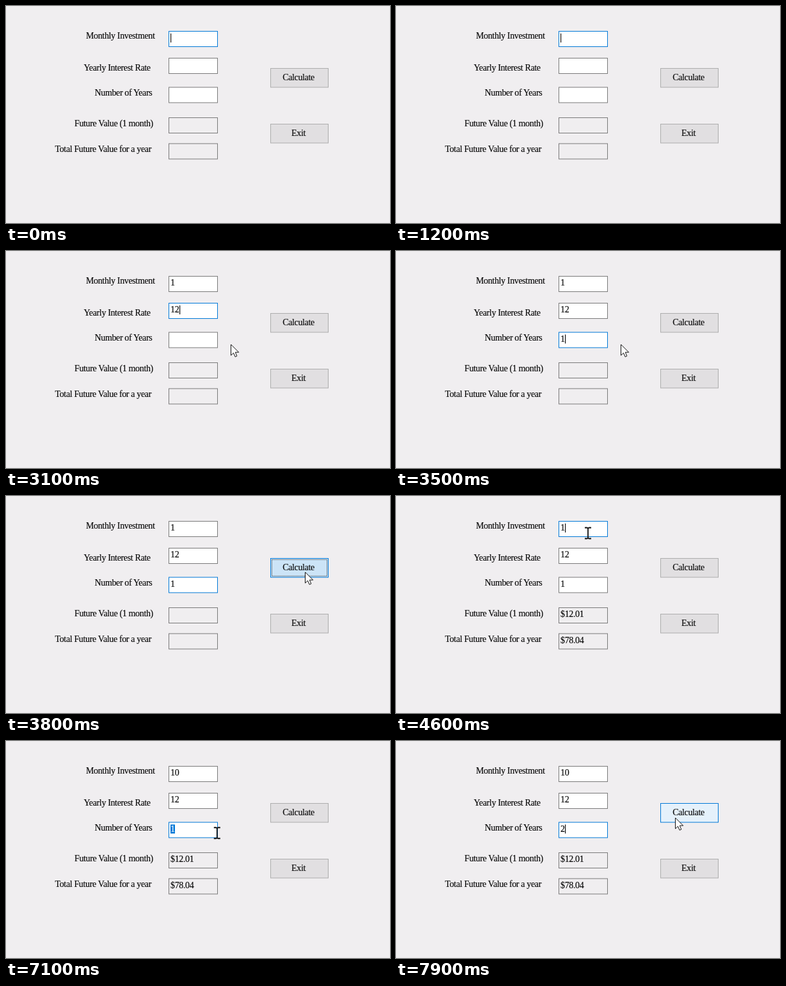
Animation, 600 px wide and 339 px high, one loop 8000 ms. Source, as an HTML page:

```html
<!DOCTYPE html>
<html lang="en">
<head>
<meta charset="utf-8">
<title>Investment calculator</title>
<style>
html, body { margin: 0; width: 100%; height: 100%; overflow: hidden; background: #f0eef0; }
svg { display: block; width: 600px; height: 339px; }
text { font: 14px "Liberation Serif", "Times New Roman", serif; letter-spacing: -.36px; fill: #0a0a0a; stroke: #0a0a0a; stroke-width: .15px; }
.picked { fill: #fff; stroke: #fff; }
</style>
</head>
<body>
<svg id="stage" viewBox="0 0 600 339"></svg>
<script>
const LOOP = 8000, STEP = 100, BLUE = '#0078d7', BACK = '#f0eef0';
const BOX = { x: 254, w: 76, h: 24 }, BUTTON = { x: 413, w: 90, h: 29.5 };
const PRESS = 3800, RELEASE = 3940;
const stage = document.getElementById('stage');

// label, label x, label baseline, box top, result
const fields = [
  ['Monthly Investment', 125, 51, 39],
  ['Yearly Interest Rate', 121.5, 100.5, 81],
  ['Number of Years', 138.5, 140, 126.5],
  ['Future Value (1 month)', 107, 188, 174, '$12.01'],
  ['Total Future Value for a year', 76.5, 228, 214.5, '$78.04']
];

// time, focused field, its value, whether it is selected
const edits = [
  [0, 0, ''], [2300, 0, '1'],
  [2500, 1, ''], [2700, 1, '1'], [2900, 1, '12'],
  [3300, 2, ''], [3500, 2, '1'],
  [RELEASE, 0, '1'], [6100, 0, '10'],
  [6700, 1, '12', true], [7000, 2, '1', true], [7340, 2, '2']
];

// pointer: start, arrival, hidden at, from, to
const trips = [
  [900, 1100, 1200, [281, 62], [295, 63]],
  [1400, 1600, 2300, [293, 20], [300, 62]],
  [2600, 3100, 3500, [372, 153], [352, 145]],
  [3500, 3800, 4200, [352, 145], [468, 118]],
  [4200, 4500, 6200, [468, 118], [300, 58]],
  [6400, 6500, 6600, [316, 65], [323, 65]],
  [6600, 7200, 7500, [323, 65], [330, 146]],
  [7700, 7900, 8000, [345, 145], [437, 119]]
];
const ARROW = '<path transform="translate(-.5 1)" d="M0 0V17L4 13.3L6.6 19.3L9.3 18.1L6.8 12.2H12.2Z" fill="#fff" stroke="#111"/>';
const BEAM = '<path d="M-5-8.5H-1.5L0-7.5L1.5-8.5H5M0-7.5V7.5M-5 8.5H-1.5L0 7.5L1.5 8.5H5" fill="none" stroke="#111" stroke-width="1.8"/>';

const rect = (x, y, w, h, fill, stroke = 'none', more = '') =>
  `<rect x="${x}" y="${y}" width="${w}" height="${h}" fill="${fill}" stroke="${stroke}" ${more}/>`;
const text = (x, y, s, more = '') => `<text x="${x}" y="${y}" ${more}>${s}</text>`;
const inside = (p, { x, w, h }, y) =>
  p && p[0] >= x && p[0] <= x + w && p[1] >= y && p[1] <= y + h;

// Blinks slowly until the first key, then quickly after each edit
function caretOn(t, since) {
  const age = (t - since) % (since ? 530 : 1500);
  return age < 265 || age >= 565;
}

function drawField([label, lx, ly, y, result], i, t) {
  const past = edits.filter(e => e[0] <= t), last = past.at(-1);
  const own = past.filter(e => e[1] === i).at(-1);
  const value = result ? (t >= RELEASE ? result : '') : own ? own[2] : '';
  const focused = last[1] === i, picked = focused && last[3];
  const end = 257 + 7 * value.length;
  let out = text(lx, ly, label)
    + rect(BOX.x + .5, y + .5, BOX.w, BOX.h, result ? BACK : '#fff', focused ? BLUE : '#7a7a7a');
  if (picked) out += rect(257, y + 4, end - 257, 14, BLUE);
  out += text(257, y + 15, value, picked ? 'class="picked"' : '');
  if (focused && !picked && caretOn(t, last[0])) out += rect(end, y + 4, 1.2, 14, '#111');
  return out;
}

function drawButton(label, y, t, pointer) {
  const hover = inside(pointer, BUTTON, y), down = hover && t >= PRESS && t < RELEASE - 40;
  const fill = down ? '#cce4f7' : hover ? '#e5f1fb' : '#e1dfe1';
  let out = rect(BUTTON.x + .5, y + .5, BUTTON.w, BUTTON.h, fill, hover ? BLUE : '#adadad');
  if (down) out += rect(BUTTON.x + 2.5, y + 2.5, BUTTON.w - 4, BUTTON.h - 4, 'none', '#333', 'stroke-dasharray="1 1"');
  return out + text(457, y + 19, label, 'text-anchor="middle"');
}

function pointerAt(t) {
  const trip = trips.find(([start, , hide]) => t >= start && t < hide);
  if (!trip) return null;
  const [start, arrive, , from, to] = trip;
  const k = Math.min(1, (t - start) / (arrive - start)), ease = 1 - (1 - k) ** 2;
  return from.map((v, j) => v + (to[j] - v) * ease);
}

function drawPointer(p) {
  if (!p) return '';
  const overBox = fields.some(f => inside(p, BOX, f[3]));
  return `<g transform="translate(${p})">${overBox ? BEAM : ARROW}</g>`;
}

let shown = -1;
function tick(now) {
  const t = Math.floor(now % LOOP / STEP) * STEP;
  if (t !== shown) {
    shown = t;
    const pointer = pointerAt(t);
    stage.innerHTML = fields.map((f, i) => drawField(f, i, t)).join('')
      + drawButton('Calculate', 97, t, pointer)
      + drawButton('Exit', 184, t, pointer)
      + drawPointer(pointer);
  }
  requestAnimationFrame(tick);
}
tick(performance.now());
</script>
</body>
</html>
```
